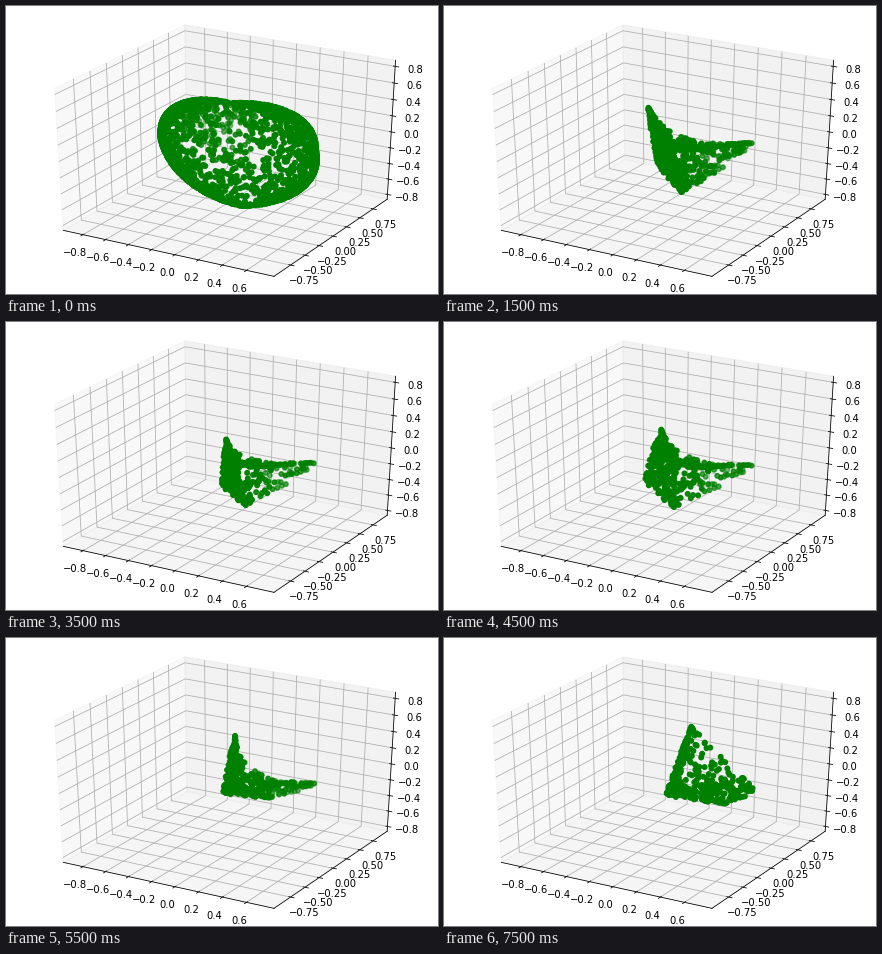
Animation, 432 px wide and 288 px high, one loop 8000 ms. Source, as a matplotlib script:

```python
import numpy as np
import matplotlib.pyplot as plt
from matplotlib.animation import FuncAnimation

W, H = 432, 288
FRAMES = 16
LIMS = np.array([(-0.94, 0.79), (-0.99, 0.985), (-0.828, 0.838)])
TICKS = [np.arange(-4, 4) / 5, np.arange(-3, 4) / 4, np.arange(-4, 5) / 5]
FORMATS = ["{:.1f}", "{:.2f}", "{:.1f}"]

# Box geometry in units of a cube centred on the origin
EDGE = 0.5 + 1 / 48
DELTA = 1 / 12
LABEL_GAP = 11.5 * 48 / (W + H) * DELTA
DIST = 10
ELEV, AZIM = np.radians(30), np.radians(-60)

VIEW = np.array([np.cos(ELEV) * np.cos(AZIM),
                 np.cos(ELEV) * np.sin(AZIM),
                 np.sin(ELEV)])
RIGHT = np.array([-np.sin(AZIM), np.cos(AZIM), 0])
UP = np.cross(VIEW, RIGHT)

plt.rcParams["font.family"] = "DejaVu Sans"
plt.rcParams["font.size"] = 10

fig = plt.figure(figsize=(W / 72, H / 72), dpi=72, facecolor="white")
ax = fig.add_axes([0, 0, 1, 1])
ax.set_xlim(0, W)
ax.set_ylim(H, 0)
ax.axis("off")


def project(points):
    """Perspective projection of cube coordinates to stage pixels."""
    p = np.atleast_2d(points)
    depth = DIST - p @ VIEW
    x = (p @ RIGHT / depth + 0.095) / 0.185 * W
    y = (0.09 - p @ UP / depth) / 0.185 * H
    return np.column_stack([x, y])


def line(points, color, z, cap="butt"):
    ax.plot(*project(points).T, color=color, lw=0.8, zorder=z,
            solid_capstyle=cap, solid_joinstyle="round")


def moved(point, axis, value):
    q = np.array(point, float)
    q[axis] = value
    return q


def draw_pane(axis, side, grey):
    a, b = [i for i in range(3) if i != axis]
    corners = []
    for u, v in [(-1, -1), (1, -1), (1, 1), (-1, 1)]:
        c = np.zeros(3)
        c[[axis, a, b]] = side * EDGE, u * EDGE, v * EDGE
        corners.append(c)
    ax.add_patch(plt.Polygon(project(corners), fc=(grey,) * 3, ec=(grey,) * 3,
                             alpha=0.5, lw=1, zorder=1))


def draw_axis(axis, base, tick_axis, z):
    back = np.array([-EDGE, EDGE, -EDGE])
    ends = [moved(base, axis, -EDGE), moved(base, axis, EDGE)]
    line(ends, "black", z, "projecting")
    lo, hi = LIMS[axis]
    out = np.sign(base[tick_axis])
    for value in TICKS[axis]:
        s = (value - lo) / (hi - lo) - 0.5
        corner = moved(back, axis, s)
        n, m = (axis + 1) % 3, (axis + 2) % 3
        line([moved(corner, n, -corner[n]), corner,
              moved(corner, m, -corner[m])], "#b0b0b0", z + 0.1)
        foot = moved(base, axis, s)
        tick = [moved(foot, tick_axis, out * (EDGE + k * DELTA))
                for k in (-0.1, 0.2)]
        line(tick, "black", z + 0.2, "projecting")
        spot = moved(foot + np.sign(base) * LABEL_GAP, axis, s)
        text = FORMATS[axis].format(value).replace("-", "\u2212")
        ax.text(*project(spot)[0], text, ha="center", va="top", zorder=z + 0.3)


draw_pane(0, -1, 0.95)
draw_pane(1, 1, 0.90)
draw_pane(2, -1, 0.925)
draw_axis(0, np.array([0, -EDGE, -EDGE]), 1, 2)
draw_axis(1, np.array([EDGE, 0, -EDGE]), 0, 3)
draw_axis(2, np.array([EDGE, EDGE, 0]), 0, 4)

# The cloud has four arms; three of them wander through these key points
MOMENTS = [0, 3, 5, 7, 9, 11, 15]
TOP = [(225, 97), (204, 101), (211, 97), (220, 117),
       (217, 107), (229, 97), (247, 88)]
BOTTOM = [(236, 200), (238, 187), (228, 181), (240, 184),
          (230, 186), (264, 160), (282, 166)]
LEFT = [(154, 130), (214, 158), (217, 160), (216, 163),
        (201, 158), (217, 155), (222, 157)]

MOST = 2000
rng = np.random.default_rng(7)
turn, reach, haze = rng.random((3, MOST))


def along(path, step):
    return np.array([np.interp(step, MOMENTS, c) for c in zip(*path)])


def ramp(step, start, end):
    return np.clip((step - start) / (end - start), 0, 1)


def cloud(step):
    fold, late = ramp(step, 0, 3), ramp(step, 11, 15)
    n = int(400 + 1600 * np.exp(-step / 2))

    core = np.array([226 + 0.5 * step, 146])
    right = np.array([310, 132 + 1.2 * step + 11 * np.exp(-step)])
    arms = np.array([along(TOP, step), right,
                     along(BOTTOM, step), along(LEFT, step)]) - core

    # Share the points among the four sectors between neighbouring arms
    share = 0.25 + fold * np.array([0, 0, -0.05, 0.05])
    s = np.interp(turn[:n], np.append(0, np.cumsum(share)), np.arange(5))
    sector = np.minimum(s.astype(int), 3)
    angle = (s - sector) * np.pi / 2

    # Superellipse sectors: a power under 2 bulges, above 2 caves in
    power = np.where(sector == 0, 0.9 + 3.1 * fold - 2 * late,
                     0.9 + 0.9 * fold)
    a = np.cos(angle) ** power
    b = np.sin(angle) ** power
    rim = a[:, None] * arms[sector] + b[:, None] * arms[(sector + 1) % 4]
    r = np.sqrt(1 - reach[:n] ** (4 - 3 * fold))
    pts = core + r[:, None] * rim

    # Points near the far side fade
    far = core + 0.65 * fold * arms[1] - (1 - fold) * np.array([14, 25])
    near = np.exp(-((pts - far) ** 2).sum(axis=1) / (2 * 25 ** 2))
    alpha = 1 - 0.65 * (1 - late) * haze[:n] * near
    order = np.argsort(alpha)
    return pts[order], alpha[order]


dots = ax.scatter([], [], s=20, linewidths=1.5, zorder=10)


def update(step):
    pts, alpha = cloud(step)
    rgba = np.tile([0, 0.5, 0, 1.0], (len(pts), 1))
    rgba[:, 3] = alpha
    dots.set_offsets(pts)
    dots.set_sizes([20])
    dots.set_facecolor(rgba)
    dots.set_edgecolor(rgba)
    return (dots,)


anim = FuncAnimation(fig, update, frames=FRAMES, interval=500, repeat=True,
                     repeat_delay=0, blit=False)
plt.show()
```
